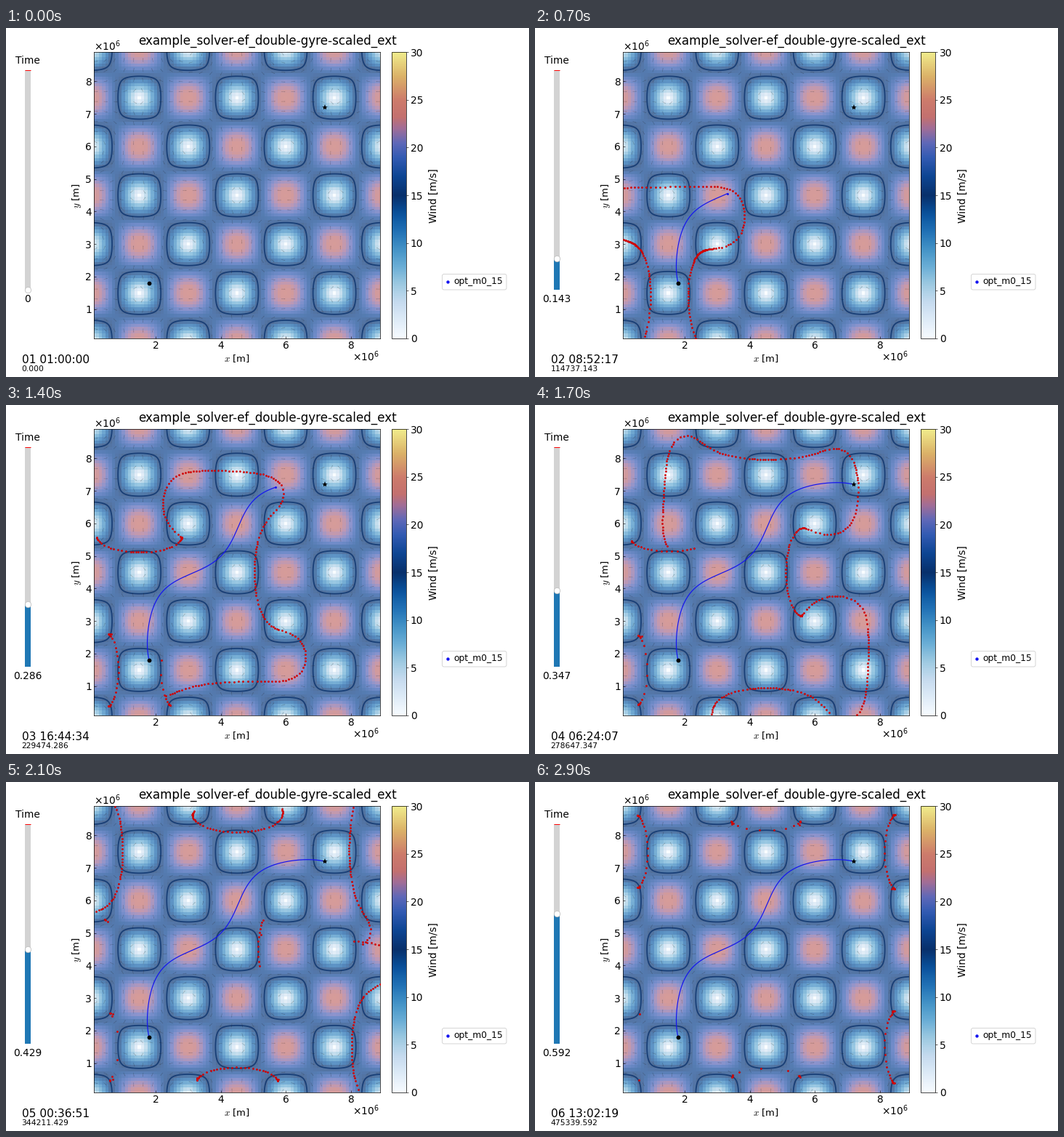
Recreate the animation shown at these times as a matplotlib script. Size 720 by 480 pixels, loop 3 s.

```python
import numpy as np
import matplotlib.pyplot as plt
from matplotlib.animation import FuncAnimation
from matplotlib.cm import ScalarMappable
from matplotlib.colors import LinearSegmentedColormap, Normalize
from matplotlib.patches import FancyBboxPatch, Rectangle

W, H = 720, 480
FRAMES, INTERVAL = 30, 100
SPAN = 803160.0              # seconds covered by the whole slider
SUB = 12                     # integration steps per frame
DT = SPAN / 49 / SUB * 1e-6  # in 1e6 s, so that speeds read as m/s and lengths as 1e6 m
TRAIL_LAG = 4                # steps the drawn path stays behind the front

AIR = 15.0
GYRE = AIR * np.pi / 2
K = np.pi / 3
START, GOAL = (1.8, 1.8), (7.2, 7.2)
LO, HI = 0.1, 8.9

BLUE, RED = "#1414f0", "#d00000"

plt.rcParams.update({
    "font.family": "DejaVu Sans",
    "mathtext.fontset": "cm",
    "axes.linewidth": 0.7,
})


# ---- flow and time-optimal extremals ----

def wind(x, y):
    return (GYRE * np.cos(K * x) * np.sin(K * y),
            -GYRE * np.sin(K * x) * np.cos(K * y))


def rate(s):
    """Time derivative of (x, y, px, py): steer along the costate p."""
    x, y, px, py = s.T
    u, v = wind(x, y)
    norm = np.hypot(px, py)
    a = GYRE * K * np.sin(K * x) * np.sin(K * y)
    b = GYRE * K * np.cos(K * x) * np.cos(K * y)
    return np.column_stack([u + AIR * px / norm, v + AIR * py / norm,
                            a * px + b * py, -b * px - a * py])


def unit(s):
    s[:, 2:] /= np.hypot(s[:, 2], s[:, 3])[:, None]
    return s


def advance(s):
    k1 = rate(s)
    k2 = rate(s + DT / 2 * k1)
    k3 = rate(s + DT / 2 * k2)
    k4 = rate(s + DT * k3)
    return unit(s + DT / 6 * (k1 + 2 * k2 + 2 * k3 + k4))


def front_speed(s):
    u, v = wind(s[:, 0], s[:, 1])
    return u * s[:, 2] + v * s[:, 3] + AIR


def launch(angles):
    one = np.ones_like(angles)
    return np.column_stack([START[0] * one, START[1] * one,
                            np.cos(angles), np.sin(angles)])


def best_path():
    """Shoot extremals and narrow the initial heading down to the goal."""
    lo, hi, n = 0.0, 2 * np.pi, 1500
    for _ in range(4):
        angles = np.linspace(lo, hi, n)
        hist = [launch(angles)]
        for _ in range(17 * SUB):
            hist.append(advance(hist[-1]))
        hist = np.array(hist)
        dist = np.hypot(hist[..., 0] - GOAL[0], hist[..., 1] - GOAL[1])
        j, i = np.unravel_index(dist.argmin(), dist.shape)
        step = (hi - lo) / (n - 1)
        lo, hi = angles[i] - 2 * step, angles[i] + 2 * step
    return hist[:j + 1, i, :2]


def fronts(cell=0.06, probe=0.15, lag=10, gap=0.155, slow=0.5):
    """Front points per frame: refined where they spread, dropped once overtaken."""
    s = launch(np.linspace(0, 2 * np.pi, 120, endpoint=False))
    link = np.ones(len(s), bool)
    seen = np.full((152, 152), np.inf)

    def cells(p):
        c = np.clip((p / cell).astype(int), 0, 151)
        return c[:, 0], c[:, 1]

    out = [np.empty((0, 2))]
    for step in range(1, (FRAMES - 1) * SUB + 1):
        s = advance(s)
        pos = s[:, :2]
        speed = front_speed(s)
        ahead = seen[cells(pos + probe * s[:, 2:])]
        patience = np.where(speed < slow, 2 * SUB, lag)
        keep = ((pos > LO) & (pos < HI)).all(axis=1) & (ahead > step - patience)
        link = (link & keep & np.roll(keep, -1))[keep]
        s, speed = s[keep], speed[keep]

        nxt = np.roll(s, -1, axis=0)
        for f in (0, 1 / 3, 2 / 3):
            c = cells(s[:, :2] + f * link[:, None] * (nxt - s)[:, :2])
            seen[c] = np.minimum(seen[c], step)

        far = np.hypot(*(nxt - s)[:, :2].T) > gap
        same_way = (s[:, 2:] * nxt[:, 2:]).sum(axis=1) > 0
        need = link & far & same_way & (speed > slow)
        if need.any() and len(s) < 1500:
            at = np.flatnonzero(need) + 1
            s = np.insert(s, at, unit((s[need] + nxt[need]) / 2), axis=0)
            link = np.insert(link, at, True)
        if step % SUB == 0:
            out.append(s[:, :2].copy())
    return out


path = best_path()
front = fronts()


# ---- static picture ----

fig = plt.figure(figsize=(W / 72, H / 72), dpi=72, facecolor="white")


def panel(left, top, right, bottom):
    return fig.add_axes([left / W, 1 - bottom / H, (right - left) / W, (bottom - top) / H])


page = panel(0, 0, W, H)
page.set(xlim=(0, W), ylim=(H, 0))
page.axis("off")


def label(x, y, text, size, **kw):
    return page.text(x, y, text, fontsize=size, **kw)


upper = [(17, "#0d4593"), (19, "#335bb3"), (20.5, "#5f68b8"), (22, "#a06d97"),
         (23.2, "#c3706f"), (25, "#cd7b6b"), (27.5, "#dbb268"), (30, "#f0ec8c")]
blues = plt.get_cmap("Blues")
cmap = LinearSegmentedColormap.from_list(
    "wind", [(i / 40, blues(i / 20)) for i in range(21)] + [(v / 30, c) for v, c in upper],
    N=512)
norm = Normalize(0, 30)

ax = panel(121, 33.2, 514.8, 427)
grid = np.linspace(LO, HI, 89)
gx, gy = np.meshgrid(grid, grid)
ax.pcolormesh(grid, grid, np.hypot(*wind(gx, gy)), cmap=cmap, norm=norm,
              alpha=0.7, shading="nearest", zorder=0)
fine = np.linspace(LO, HI, 300)
fx, fy = np.meshgrid(fine, fine)
ax.contour(fine, fine, np.hypot(*wind(fx, fy)), levels=[AIR], colors=["#08306b"],
           alpha=0.78, linewidths=1.8, zorder=1)
coarse = np.linspace(LO, HI, 30)
qx, qy = np.meshgrid(coarse, coarse)
qu, qv = wind(qx, qy)
qn = np.hypot(qu, qv) + 1e-9
ax.quiver(qx, qy, qu / qn, qv / qn, scale=70, width=0.0013, headwidth=2.5,
          headlength=3, headaxislength=3, color="#202020", alpha=0.33, zorder=2)
ax.set(xlim=(LO, HI), ylim=(LO, HI), xticks=range(2, 9, 2), yticks=range(1, 9))
ax.tick_params(direction="in", length=3, width=0.6, pad=3, labelsize=13.8)

cax = panel(531, 33.2, 550.8, 427)
bar = fig.colorbar(ScalarMappable(norm, cmap), cax=cax, ticks=range(0, 31, 5))
bar.outline.set_linewidth(0.7)
cax.tick_params(length=3, width=0.6, pad=3, labelsize=13.8)

power = r"×10$^{\mathregular{6}}$"
label(360, 23, "example_solver-ef_double-gyre-scaled_ext", 16.7, ha="center")
label(121, 31, power, 13.8)
label(514, 458, power, 13.8, ha="right")
label(318.4, 459, "$x$ [m]", 13.2, ha="center")
label(97.5, 231, "$y$ [m]", 13.2, ha="center", va="center", rotation=90)
label(588.5, 231, "Wind [m/s]", 13.6, ha="center", va="center", rotation=90)
label(29.7, 49, "Time", 13.7, ha="center")

page.add_patch(FancyBboxPatch((600.5, 338.5), 88.5, 21.5, lw=0.8, fc="white", ec="#cccccc",
                              boxstyle="round,pad=0,rounding_size=2.5"))
page.plot(608, 349, "o", ms=4.4, mew=0, color=BLUE)
label(616, 352, "opt_m0_15", 12.2)

# vertical slider
slot = fig.add_axes([0.03, 0.25, 0.0225, 0.63])
slot.set(xlim=(0, 1), ylim=(0, 1))
slot.axis("off")
slot.add_patch(Rectangle((0.25, 0), 0.5, 1, fc="lightgray", lw=0))
fill = slot.add_patch(Rectangle((0.25, 0), 0.5, 0, fc="#1f77b4", lw=0))
slot.plot([0.25, 0.75], [1, 1], color="red", lw=1, solid_capstyle="butt")
knob, = slot.plot([0.5], [0], "o", ms=8.3, mfc="white", mec="0.75", mew=0.8,
                  clip_on=False, zorder=5)

# ---- moving parts ----

dots, = ax.plot([], [], "o", ms=2.8, mew=0, color=RED, zorder=4)
trail, = ax.plot([], [], color=BLUE, lw=1.2, zorder=5)
tip, = ax.plot([], [], "o", ms=3, mew=0, color=BLUE, zorder=5)
ax.plot(*START, "o", ms=5.8, mew=0, color="black", zorder=6)
ax.plot(*GOAL, "*", ms=8.4, mew=0, color="black", zorder=6)
value = label(29.7, 377, "", 13.8, ha="center")
clock = label(21.6, 461, "", 15.4)
seconds = label(21.6, 472, "", 10.8)


def short(v):
    digits = next((d for d in range(3) if abs(v - round(v, d)) < 1e-3), 3)
    return f"{v:.{digits}f}"


def draw(k):
    v = k / 49
    t = SPAN * v
    fill.set_height(v)
    knob.set_ydata([v])
    value.set_text(short(v))

    days, rest = divmod(int(t) + 3600, 86400)
    clock.set_text(f"{days + 1:02d} {rest // 3600:02d}:{rest // 60 % 60:02d}:{rest % 60:02d}")
    seconds.set_text(f"{t:.3f}")

    dots.set_data(*front[k].T)
    done = path[:max(k * SUB - TRAIL_LAG, 0) + 1]
    trail.set_data(*done.T)
    tip.set_data(*done[-1:].T)
    return dots, trail, tip, fill, knob, value, clock, seconds


anim = FuncAnimation(fig, draw, frames=FRAMES, interval=INTERVAL, repeat=True, blit=False)
plt.show()
```
